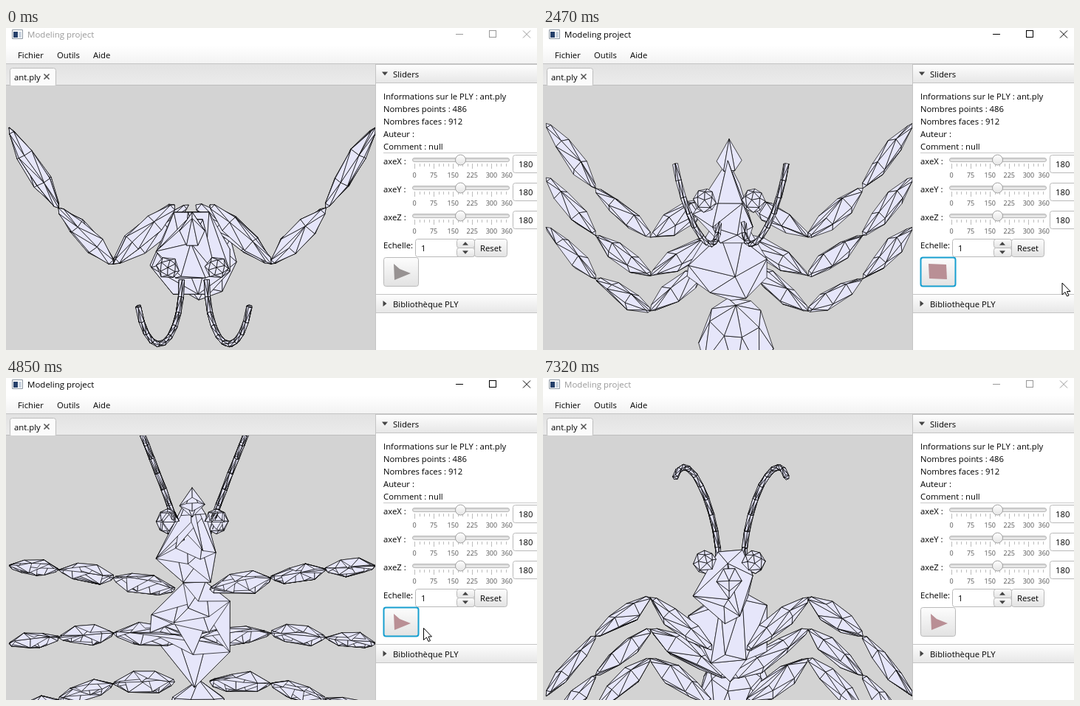
An HTML page with a canvas that plays this animation: 719x437 px, repeating every 7390 ms.

```html
<!DOCTYPE html>
<html lang="fr">
<meta charset="utf-8">
<title>Modeling project</title>
<style>
  html, body { margin: 0; width: 719px; height: 437px; overflow: hidden; background: #fff; }
  canvas { display: block; }
</style>
<canvas width="719" height="437"></canvas>
<script>
const ctx = document.querySelector('canvas').getContext('2d');
const LOOP = 7390, REFRESH = 67, CENTER_Y = 325, DEG_PER_MS = 0.0324;
const FONT = '"Open Sans", "Noto Sans", sans-serif';

// ---------- timing ----------
const playing = [[1054, 3970], [4853, 6412]];
const place = { edge: [690, 410], button: [543, 338], side: [703, 346], right: [664, 346], middle: [637, 343] };
const moves = [[170, 790, 'button'], [1340, 1600, 'side'], [3220, 3700, 'button'], [3970, 4450, 'right'],
  [4710, 4850, 'button'], [5000, 5380, 'middle'], [5700, 5910, 'button'], [6560, 6990, 'edge']];

function cursorAt(t) {
  let from = place.edge;
  for (const [start, end, name] of moves) {
    if (t < start) break;
    from = mix(from, place[name], Math.min(1, (t - start) / (end - start)));
  }
  return from;
}

const angleAt = t => DEG_PER_MS * Math.PI / 180 *
  playing.reduce((sum, [a, b]) => sum + Math.max(0, Math.min(t, b) - a), 0);

// ---------- mesh: points are [x, height, length] ----------
let seed = 7;
const random = () => (seed = seed * 16807 % 2147483647) / 2147483647;
const sub = (a, b) => a.map((v, i) => v - b[i]);
const dot = (a, b) => a[0] * b[0] + a[1] * b[1] + a[2] * b[2];
const cross = (a, b) => [a[1] * b[2] - a[2] * b[1], a[2] * b[0] - a[0] * b[2], a[0] * b[1] - a[1] * b[0]];
const unit = a => a.map(v => v / Math.hypot(...a));
const mix = (a, b, f) => a.map((v, i) => v + (b[i] - v) * f);
const faces = [];

// Adds the convex hull of a few points as triangles with outward normals
function addHull(points) {
  const p = points.map(q => q.map(v => v + random() * 0.2));
  for (let i = 0; i < p.length; i++)
    for (let j = i + 1; j < p.length; j++)
      for (let k = j + 1; k < p.length; k++) {
        const normal = cross(sub(p[j], p[i]), sub(p[k], p[i]));
        const sides = p.filter((_, m) => m !== i && m !== j && m !== k).map(q => dot(normal, sub(q, p[i])));
        if (sides.every(s => s <= 0)) faces.push({ points: [p[i], p[j], p[k]], normal });
        else if (sides.every(s => s >= 0)) faces.push({ points: [p[i], p[j], p[k]], normal: normal.map(v => -v) });
      }
}

// Adds a rim with a smaller facet above and below it
function addGem(rim, top, bottom) {
  const center = rim.reduce((c, p) => mix(c, p, 1 / rim.length), [0, 0, 0])
    .map((_, i) => rim.reduce((s, p) => s + p[i], 0) / rim.length);
  const facet = (v, odd) => rim.filter((_, i) => i % 2 === odd)
    .map(p => mix(p, center, 0.55)).map(([x, , l]) => [x, v, l]);
  addHull([...rim, ...facet(top, 0), ...facet(bottom, 1)]);
}

function ring(center, axis, radius, count, jitter) {
  const u = unit(cross(axis, [0, 0, 1])), w = unit(cross(axis, u));
  return Array.from({ length: count }, (_, i) => {
    const a = (i + jitter * random()) / count * 2 * Math.PI;
    const r = radius * (1 + jitter * (random() - 0.5));
    return center.map((c, n) => c + r * (u[n] * Math.cos(a) + w[n] * Math.sin(a)));
  });
}

function addSpindle(a, b, radius) {
  const rings = [0.06, 0.33, 0.68, 0.96].map((f, i) =>
    ring(mix(a, b, f), sub(b, a), i % 3 ? radius : radius * 0.35, i % 3 ? 5 : 3, 0.5));
  addHull([a, b, ...rings.flat()]);
}

function addEllipsoid(center, radii, rows, columns) {
  const points = [];
  for (let r = 0; r <= rows; r++) {
    const lat = r / rows * Math.PI;
    const n = r % rows ? columns : 1;
    for (let c = 0; c < n; c++) {
      const lon = (c + r / 2 + random() * 0.3) / n * 2 * Math.PI;
      const dir = [Math.sin(lat) * Math.cos(lon), Math.sin(lat) * Math.sin(lon), -Math.cos(lat)];
      points.push(center.map((v, i) => v + radii[i] * dir[i]));
    }
  }
  addHull(points);
}

function addLeg(side, spread) {
  const joint = (x, v, reach) => side([x, v, 21 + spread * reach]);
  const joints = [joint(4, -190, 1), joint(71, -81, 0.87), joint(145, -5, 0.71),
    joint(spread ? 228 : 247, -85, 0.62)];
  for (let i = 0; i < 3; i++) addSpindle(joints[i], joints[i + 1], 11 + i * 1.5);
}

function addAntenna(side) {
  const path = Array.from({ length: 11 }, (_, i) => {
    const a = i / 10 * 2.72, x = 207 + 30.5 * Math.cos(a);
    return side([x, 17 + 87 * Math.sin(a), -105 - (237 - x) * 2.62]);
  });
  const rings = path.map((p, i) =>
    ring(p, sub(path[Math.min(i + 1, 10)], path[Math.max(i - 1, 0)]), 3.8, 5, 0.1));
  for (let i = 0; i < 10; i++) addHull([...rings[i], ...rings[i + 1]]);
}

function buildAnt() {
  const mandible = [[252, -67, -182], [235, -50, -156], [252, -40, -140], [269, -50, -158]];
  const head = [[250, -33, -175], [270, 14, -140], [284, 8, -88], [277, 0, -48], [240, 0, -48],
    [203, -22, -82], [237, 12, -138]];
  const thorax = [[240, -14, -48], [270, -5, -49], [303, 5, -22], [303, -25, 45], [255, -28, 93], [195, -3, 20],
    [197, 0, -4]];
  addGem(mandible, -75, -30);
  addGem(head, -65, 14);
  addGem(thorax, -75, 36);
  addEllipsoid([261, -10, 166], [51, 54, 82], 4, 8);
  for (const axis of [0, 504]) {
    const side = ([x, v, l]) => [axis ? axis - x : x, v, l];
    addEllipsoid(side([219, 0, -131]), [16, 15, 17], 4, 6);
    for (const spread of [-106, 0, 97]) addLeg(side, spread);
    addAntenna(([x, v, l]) => [axis ? axis + 5 - x : x, v, l]);
  }
}

// At rest the viewer paints every face in the order of the unrotated model
function drawAnt(angle, resting) {
  const sin = Math.sin(angle), cos = Math.cos(angle);
  const depth = resting ? ([, , l]) => -l : ([, v, l]) => v * sin - l * cos;
  const visible = faces.filter(f => resting || depth(f.normal) > 0);
  for (const f of visible) f.depth = f.points.reduce((s, p) => s + depth(p), 0);
  visible.sort((a, b) => a.depth - b.depth);

  ctx.save();
  ctx.beginPath();
  ctx.rect(0, 78, 500, 359);
  ctx.clip();
  ctx.fillStyle = '#d3d3d3';
  ctx.fill();
  ctx.fillStyle = '#e6e6fa';
  ctx.strokeStyle = '#000';
  ctx.lineWidth = 0.7;
  ctx.lineJoin = 'round';
  for (const f of visible) {
    ctx.beginPath();
    for (const [x, v, l] of f.points) ctx.lineTo(x, CENTER_Y + v * cos + l * sin);
    ctx.closePath();
    ctx.fill();
    ctx.stroke();
  }
  ctx.restore();
}

// ---------- window ----------
function text(str, x, y, color = '#000', size = 11.3, align = 'left') {
  ctx.font = `${size}px ${FONT}`;
  ctx.textAlign = align;
  ctx.fillStyle = color;
  ctx.fillText(str, x, y);
}

function rect(x, y, w, h, color) {
  ctx.fillStyle = color;
  ctx.fillRect(x, y, w, h);
}

function gradient(y, h, top, bottom) {
  const g = ctx.createLinearGradient(0, y, 0, y + h);
  g.addColorStop(0, top);
  g.addColorStop(1, bottom);
  return g;
}

function box(x, y, w, h, fill, stroke = '#b9b9b9', radius = 3, width = 1) {
  ctx.beginPath();
  ctx.roundRect(x + 0.5, y + 0.5, w - 1, h - 1, radius);
  ctx.fillStyle = fill;
  ctx.fill();
  ctx.strokeStyle = stroke;
  ctx.lineWidth = width;
  ctx.stroke();
}

function line(color, width, x1, y1, x2, y2) {
  ctx.beginPath();
  ctx.moveTo(x1, y1);
  ctx.lineTo(x2, y2);
  ctx.strokeStyle = color;
  ctx.lineWidth = width;
  ctx.stroke();
}

function crossMark(x, y, r, color, width) {
  line(color, width, x - r, y - r, x + r, y + r);
  line(color, width, x + r, y - r, x - r, y + r);
}

function polygon(color, ...points) {
  ctx.beginPath();
  for (const [x, y] of points) ctx.lineTo(x, y);
  ctx.closePath();
  ctx.fillStyle = color;
  ctx.fill();
}

// Small triangle pointing right, down or up for 0, 1 or -1 quarter turns
function arrow(x, y, turns, half, length) {
  const c = Math.cos(turns * Math.PI / 2), s = Math.sin(turns * Math.PI / 2);
  polygon('#444', ...[[-length / 2, -half], [length / 2, 0], [-length / 2, half]]
    .map(([a, b]) => [x + a * c - b * s, y + a * s + b * c]));
}

const buttonFill = (y, h) => gradient(y, h, '#fdfdfd', '#e2e2e2');

function drawTitleBar(active) {
  const color = active ? '#000' : '#999';
  box(8, 2, 15, 13, '#fff', '#8d98a3', 0);
  rect(10, 5, 6, 8, '#26416b');
  rect(17, 5, 4, 8, '#c9d3df');
  text('Modeling project', 29, 13, color, 11.5);
  line(color, 1, 609, 8.5, 619, 8.5);
  crossMark(705, 8.5, 5, color, 1);
  ctx.strokeRect(654.5, 3.5, 9, 9);
}

function drawMenuAndTabs() {
  rect(0, 24, 719, 25, gradient(24, 25, '#ffffff', '#f2f2f2'));
  rect(0, 48, 719, 1, '#c4c4c4');
  text('Fichier', 16, 41);
  text('Outils', 69, 41);
  text('Aide', 118, 41);
  rect(0, 49, 500, 29, gradient(49, 29, '#e2e2e2', '#ececec'));
  rect(0, 77, 500, 1, '#bdbdbd');
  box(5, 54, 63, 26, '#fbfbfb', '#bdbdbd');
  text('ant.ply', 11, 71);
  crossMark(55, 66, 3.5, '#555', 1.6);
}

function drawPaneHeader(y, title, open) {
  box(500, y, 225, 26, gradient(y, 26, '#fefefe', '#e6e6e6'), '#c4c4c4', 0);
  arrow(513, y + 13, open ? 1 : 0, 4, 5);
  text(title, 524, y + 17.5);
}

function drawSlider(label, y) {
  text(label, 511, y + 5);
  box(550, y - 4, 132, 6, gradient(y - 4, 6, '#d0d0d0', '#f4f4f4'), '#b4b4b4');
  for (let i = 0; i <= 19; i++) {
    const x = Math.round(553 + i * 6.5) + 0.5;
    line('#bcbcbc', 1, x, y + 4, x, y + (i % 4 ? 8 : 11));
  }
  [0, 75, 150, 225, 300, 360].forEach(v => text(v, 553 + v * 0.348, y + 23, '#555', 9, 'center'));
  ctx.beginPath();
  ctx.arc(615.5, y - 1, 7, 0, 7);
  ctx.fillStyle = gradient(y - 8, 14, '#ffffff', '#e4e4e4');
  ctx.fill();
  ctx.strokeStyle = '#a0a0a0';
  ctx.lineWidth = 1;
  ctx.stroke();
  box(686, y - 8, 40, 25, '#fff');
  text('180', 694, y + 9);
}

function drawPanel(isPlaying, focused, started) {
  rect(500, 49, 219, 388, '#fff');
  drawPaneHeader(49, 'Sliders', true);
  ['Informations sur le PLY : ant.ply', 'Nombres points : 486', 'Nombres faces : 912', 'Auteur :', 'Comment : null']
    .forEach((s, i) => text(s, 511, 97 + i * 17));
  rect(511, 169, 208, 1, '#c8c8c8');
  ['axeX :', 'axeY :', 'axeZ :'].forEach((s, i) => drawSlider(s, 180 + i * 38));

  text('Echelle:', 511, 299);
  box(554, 286, 81, 25, '#fff');
  for (const turns of [-1, 1]) {
    const y = 292 + 6 * turns;
    box(610, y, 25, 13, buttonFill(y, 13));
    arrow(622, y + 6.5, turns, 4, 4.5);
  }
  text('1', 562, 303);
  box(634, 286, 45, 25, buttonFill(286, 25));
  text('Reset', 642, 303);

  box(511, 311, 48, 40, buttonFill(311, 40), focused ? '#189fd0' : '#b9b9b9', 3, focused ? 2 : 1);
  if (isPlaying) polygon('#b98f95', [522, 320], [546, 321], [547, 341], [523, 340]);
  else polygon(started ? '#b98f95' : '#979292', [525, 320], [533, 327], [548, 333], [526, 342]);

  drawPaneHeader(361, 'Bibliothèque PLY', false);
  rect(500, 49, 1, 388, '#c4c4c4');
}

function drawCursor([x, y]) {
  const shape = [[0, 0], [0, 16], [4, 12.5], [6.5, 18], [9, 17], [6.5, 11.5], [11, 11.5]];
  polygon('#fff', ...shape.map(([dx, dy]) => [x + dx, y + dy]));
  ctx.strokeStyle = '#000';
  ctx.lineWidth = 1;
  ctx.stroke();
}

function draw(now) {
  const t = Math.floor(now % LOOP / REFRESH) * REFRESH;
  const active = t >= 100 && t < 7290;
  const started = t >= playing[0][0];
  const isPlaying = playing.some(([a, b]) => t >= a && t < b);
  rect(0, 0, 719, 437, '#fff');
  drawTitleBar(active);
  drawMenuAndTabs();
  drawAnt(angleAt(t), !isPlaying);
  drawPanel(isPlaying, active && started, started);
  if (t > 170 && t < 7060) drawCursor(cursorAt(t));
}

buildAnt();
const start = performance.now();
function tick() {
  draw(performance.now() - start);
  requestAnimationFrame(tick);
}
tick();
</script>
</html>
```
